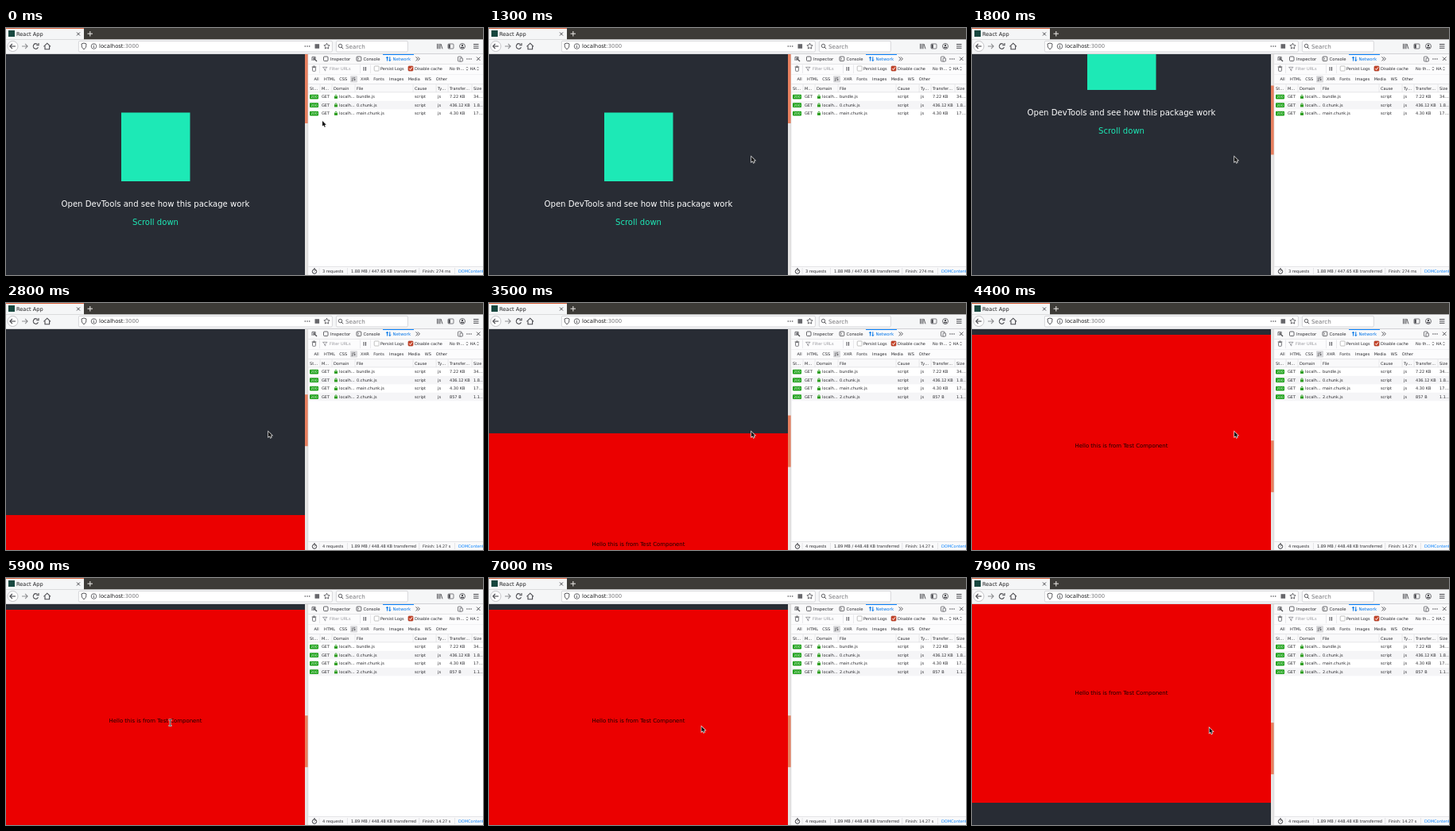
An HTML page with a canvas that plays this animation: 600x311 px, repeating every 8000 ms.

```html
<!DOCTYPE html>
<html lang="en">
<head>
<meta charset="utf-8">
<title>Lazy loading demo</title>
<style>
html, body { margin: 0; width: 600px; height: 311px; overflow: hidden; }
canvas { display: block; width: 600px; height: 311px; }
</style>
</head>
<body>
<canvas id="stage"></canvas>
<script>
const W = 600, H = 311, LOOP = 8000, STEP = 100;
const TOP = 33, VIEW = 278, PAGE_W = 376;
const LOAD_AT = 2500;
const FONT = '"DejaVu Sans", sans-serif';
const DARK = '#282c34', MINT = '#1de9b6', INK = '#2a2a2e', ICON = '#4a4a4f', BLUE = '#0074e8';

// [time, scroll]
const SCROLL = [[1400, 0], [1800, 115], [2800, 322], [3800, 469], [4400, 549], [7300, 549], [7900, 584]];
// [time, x, y]
const POINTER = [[0, 398, 117], [1000, 330, 162], [4500, 330, 162], [5100, 302, 173], [5300, 302, 173],
  [5900, 206, 182], [6200, 205, 184], [6400, 205, 184], [7300, 298.5, 188.5]];

const canvas = document.getElementById('stage');
const c = canvas.getContext('2d');
const ratio = window.devicePixelRatio || 1;
canvas.width = W * ratio;
canvas.height = H * ratio;

function track(keys, t, i) {
  if (t <= keys[0][0]) return keys[0][i];
  for (let k = 1; k < keys.length; k++) {
    const a = keys[k - 1], b = keys[k];
    if (t <= b[0]) return a[i] + (b[i] - a[i]) * (t - a[0]) / (b[0] - a[0]);
  }
  return keys[keys.length - 1][i];
}

function box(x, y, w, h, color) {
  c.fillStyle = color;
  c.fillRect(x, y, w, h);
}

function round(x, y, w, h, r, fill, stroke) {
  c.beginPath();
  c.roundRect(x, y, w, h, r);
  if (fill) { c.fillStyle = fill; c.fill(); }
  if (stroke) { c.strokeStyle = stroke; c.lineWidth = 0.7; c.stroke(); }
}

function disc(x, y, r, fill, stroke, width = 0.9) {
  c.beginPath();
  c.arc(x, y, r, 0, Math.PI * 2);
  if (fill) { c.fillStyle = fill; c.fill(); }
  if (stroke) { c.strokeStyle = stroke; c.lineWidth = width; c.stroke(); }
}

function line(points, color = ICON, width = 1) {
  c.beginPath();
  points.forEach(([x, y], i) => i ? c.lineTo(x, y) : c.moveTo(x, y));
  c.strokeStyle = color;
  c.lineWidth = width;
  c.stroke();
}

// y is the middle of the capitals
function text(s, x, y, size = 5, color = INK, align = 'left') {
  c.font = `${size}px ${FONT}`;
  c.textAlign = align;
  c.fillStyle = color;
  c.fillText(s, x, y + size * 0.365);
}

function dots(x, y, gap, r) {
  for (let i = -1; i <= 1; i++) disc(x + i * gap, y, r, ICON);
}

function magnifier(x, y) {
  disc(x - 0.5, y - 0.5, 2.2, null, ICON);
  line([[x + 1.2, y + 1.2], [x + 3.2, y + 3.2]]);
}

function star(x, y, r) {
  const points = [];
  for (let i = 0; i <= 10; i++) {
    const a = i * Math.PI / 5 - Math.PI / 2, d = i % 2 ? r * 0.48 : r;
    points.push([x + d * Math.cos(a), y + d * Math.sin(a)]);
  }
  line(points, ICON, 0.8);
}

function arrow(x, y, dir) {
  line([[x - 3.5 * dir, y], [x + 3.5 * dir, y]], ICON, 1.1);
  line([[x + 0.6 * dir, y - 3], [x + 3.6 * dir, y], [x + 0.6 * dir, y + 3]], ICON, 1.1);
}

function chrome() {
  box(0, 0, W, 14.5, '#3d3b37');
  box(0, 0, 98, 14.5, '#f5f6f7');
  box(0, 0, 98, 1, '#d9603b');
  box(3, 3, 8, 8, '#17473f');
  text('React App', 13, 7.5, 6.6, '#1c1c1e');
  line([[89, 5.5], [93, 9.5]]);
  line([[93, 5.5], [89, 9.5]]);
  line([[102.5, 7.2], [109, 7.2]], '#deddda', 1.1);
  line([[105.8, 4], [105.8, 10.5]], '#deddda', 1.1);

  box(0, 14.5, W, 18.5, '#f5f6f7');
  box(0, 32.2, W, 0.8, '#c9c9cc');
  disc(8.5, 23, 6.5, '#fff', '#b8b8bc', 0.8);
  arrow(8.5, 23, -1);
  c.globalAlpha = 0.55;
  arrow(23.5, 23, 1);
  c.globalAlpha = 1;
  c.beginPath();
  c.arc(37.5, 23, 3.2, 0.4, 5.4);
  c.strokeStyle = ICON;
  c.lineWidth = 1.1;
  c.stroke();
  line([[41, 19], [41, 21.8], [38.2, 21.8]], ICON, 1.1);
  line([[47.5, 23.3], [51.8, 19.2], [56, 23.3]], ICON, 1.1);
  line([[49, 22.8], [49, 26.8], [54.6, 26.8], [54.6, 22.8]], ICON, 1.1);

  round(91.4, 16.4, 319, 13.6, 1.5, '#fff', '#c8c8cc');
  line([[98, 19], [101, 20], [100.6, 24], [98, 27], [95.4, 24], [95, 20], [98, 19]], ICON, 0.9);
  disc(110.5, 23, 3.3, null, ICON, 0.8);
  line([[110.5, 22.4], [110.5, 25]], ICON, 0.9);
  line([[110.5, 20.7], [110.5, 21.5]], ICON, 0.9);
  text('localhost', 117, 23, 6.8, '#1c1c1e');
  const hostWidth = c.measureText('localhost').width;
  text(':3000', 117 + hostWidth, 23, 6.8, '#77777a');
  dots(379, 23, 2.7, 0.8);
  box(388.5, 20.2, 5.6, 5.6, '#67676b');
  star(403.5, 23, 3.8);

  round(415.4, 16.4, 90, 13.6, 1.5, '#fff', '#c8c8cc');
  magnifier(421, 23);
  text('Search', 427, 23, 7.2, '#747478');

  for (let x = 542.5; x < 547; x += 1.8) line([[x, 19.8], [x, 26.3]], ICON, 0.9);
  line([[547, 20], [549, 26.3]], ICON, 0.9);
  round(556, 20, 7, 6, 1, null, ICON);
  box(556.5, 20.5, 2.3, 5, ICON);
  disc(574, 23, 3.5, null, ICON, 0.8);
  disc(574, 21.9, 1.2, ICON);
  box(572, 23.8, 4, 1.5, ICON);
  for (let y = 20.5; y < 26; y += 2.4) line([[588, y], [594.5, y]]);
}

function page(t, scroll) {
  const loaded = t >= LOAD_AT;
  c.save();
  c.beginPath();
  c.rect(0, TOP, PAGE_W, VIEW);
  c.clip();
  box(0, TOP, PAGE_W, VIEW, DARK);
  c.translate(0, TOP - scroll);
  box(145, 73.5, 86.5, 86.5, MINT);
  text('Open DevTools and see how this package work', 188, 188.7, 10.08, '#fff', 'center');
  text('Scroll down', 188, 210.9, 10.08, MINT, 'center');
  if (loaded) {
    box(0, 2 * VIEW, PAGE_W, VIEW, '#eb0000');
    text('Hello this is from Test Component', 188, 2 * VIEW + 139, 6.95, '#180000', 'center');
  }
  c.restore();

  const thumb = loaded ? 65 : 87, range = VIEW * (loaded ? 3 : 2);
  box(PAGE_W, TOP, 4, VIEW, '#e6e5e4');
  box(PAGE_W, TOP + scroll / range * (VIEW - thumb), 4, thumb, '#e8805f');
  box(379.6, TOP, 0.8, VIEW, '#d0d0d3');
}

function tabs() {
  box(380.4, 33, 220, 12.5, '#f9f9fa');
  line([[385, 41], [385, 36.5], [389.5, 36.5]], ICON, 0.8);
  line([[387, 38], [391, 42]], ICON, 1.2);
  line([[387, 41], [387, 38], [390, 38]], ICON, 1);
  round(399.5, 36, 5.5, 5.5, 1, null, INK);
  text('Inspector', 408, 38.8, 5.4);
  round(441, 36, 5.8, 5.5, 1, null, INK);
  line([[442.2, 37.5], [443.6, 38.8], [442.2, 40]], INK, 0.7);
  text('Console', 449.5, 38.8, 5.3);
  box(474, 33, 39, 1, '#0a84ff');
  line([[479.5, 41.5], [479.5, 36.3]], BLUE, 1);
  line([[478, 38], [479.5, 36.2], [481, 38]], BLUE, 0.8);
  line([[482.8, 36.3], [482.8, 41.5]], BLUE, 1);
  line([[481.3, 39.8], [482.8, 41.6], [484.3, 39.8]], BLUE, 0.8);
  text('Network', 486.5, 38.8, 5.4, BLUE);
  for (const x of [515.5, 518]) line([[x, 36.4], [x + 2.4, 38.9], [x, 41.4]], ICON, 0.9);
  round(568.5, 36, 4.5, 6, 0.8, null, ICON);
  round(571, 38, 3.5, 4, 0.6, '#f9f9fa', ICON);
  dots(582.5, 39, 2.5, 0.75);
  line([[592, 36.5], [596.5, 41]], ICON, 0.9);
  line([[596.5, 36.5], [592, 41]], ICON, 0.9);
}

function spinner(x, y) {
  line([[x, y - 0.8], [x + 1, y - 2], [x + 2, y - 0.8]], INK, 0.6);
  line([[x, y + 0.8], [x + 1, y + 2], [x + 2, y + 0.8]], INK, 0.6);
}

function filters() {
  box(380.4, 45.5, 220, 12.8, '#fcfcfd');
  box(380.4, 45.2, 220, 0.6, '#d7d7db');
  box(380.4, 58, 220, 0.6, '#e0e0e2');
  line([[384.7, 49], [390.3, 49]], ICON, 0.9);
  line([[386.5, 48], [388.5, 48]], ICON, 0.8);
  round(385.5, 49.5, 4, 4.8, 0.7, null, ICON);
  box(394, 46.5, 0.5, 10.5, '#d7d7db');
  line([[398.5, 49.3], [404, 49.3], [401.8, 51.6], [401.8, 54], [400.6, 53], [400.6, 51.6], [398.5, 49.3]], '#8a8a90', 0.8);
  text('Filter URLs', 407, 51.5, 5, '#98989d');
  box(445.2, 46.5, 0.5, 10.5, '#d7d7db');
  box(449.6, 49, 1, 4.8, ICON);
  box(452, 49, 1, 4.8, ICON);
  box(458.2, 46.5, 0.5, 10.5, '#d7d7db');
  round(463.2, 48, 6, 6, 1, '#fff', '#aaa9a6');
  text('Persist Logs', 471, 51.2);
  round(506, 48, 6, 6, 1, '#c8462c', '#a63a25');
  line([[507.3, 51], [508.6, 52.6], [511, 49.3]], '#fff', 1);
  text('Disable cache', 514, 51.2);
  text('No th…', 558, 51.2);
  spinner(579, 51.2);
  text('HA', 583.5, 51.2);
  spinner(592.5, 51.2);

  box(380.4, 58.6, 220, 12, '#fcfcfd');
  round(433, 60.2, 9, 8.2, 1, '#d9d9dc');
  [['All', 387.5], ['HTML', 400], ['CSS', 419.3], ['JS', 435], ['XHR', 446], ['Fonts', 462.3],
    ['Images', 482], ['Media', 505.8], ['WS', 526.8], ['Other', 540.8]]
    .forEach(([s, x]) => text(s, x, 64.3));
}

const COLS = [382, 397, 412, 441, 514, 543, 558, 588];

function lock(x, y) {
  box(x - 2, y - 0.6, 4, 3, '#2a9c1c');
  c.beginPath();
  c.arc(x, y - 0.8, 1.3, Math.PI, 0);
  c.strokeStyle = '#2a9c1c';
  c.lineWidth = 0.8;
  c.stroke();
}

function request(i, file, transfer, size) {
  const y = 86.5 + i * 10.5;
  if (i % 2) box(380.4, y - 5.2, 220, 10.5, '#f5f5f7');
  round(382, y - 2.8, 11, 5.8, 1, '#1c9f18');
  text('200', 387.5, y + 0.1, 4.4, '#eaffea', 'center');
  lock(415, y);
  ['GET', '', 'script', 'js', transfer, size].forEach((s, k) => {
    const col = [1, 2, 4, 5, 6, 7][k];
    text(s, COLS[col], y);
  });
  text('localh…', 419, y);
  text(file, COLS[3], y);
}

function network(t) {
  const loaded = t >= LOAD_AT;
  box(380.4, 33, 220, VIEW, '#fff');
  tabs();
  filters();
  box(380.4, 70.6, 220, 10.4, '#f9f9fa');
  box(380.4, 70.4, 220, 0.6, '#d7d7db');
  box(380.4, 80.6, 220, 0.6, '#d7d7db');
  ['St…', 'M…', 'Domain', 'File', 'Cause', 'Ty…', 'Transfer…', 'Size']
    .forEach((s, i) => {
      text(s, COLS[i], 75.7);
      if (i) box(COLS[i] - 2.2, 71, 0.5, 10, '#d7d7db');
    });
  request(0, 'bundle.js', '7.22 KB', '34.…');
  request(1, '0.chunk.js', '436.12 KB', '1.8…');
  request(2, 'main.chunk.js', '4.30 KB', '17.…');
  if (loaded) request(3, '2.chunk.js', '857 B', '1.1…');

  box(380.4, 300, 220, 11, '#f9f9fa');
  box(380.4, 300, 220, 0.6, '#d7d7db');
  disc(388, 306.6, 2.7, null, INK, 0.9);
  line([[388, 306.6], [389.4, 305.2]], INK, 0.8);
  line([[387, 303], [389, 303]], INK, 0.9);
  for (const x of [393.8, 429, 519.6, 564]) box(x, 302, 0.5, 8, '#d0d0d4');
  text(loaded ? '4 requests' : '3 requests', 398, 306.2);
  text(loaded ? '1.89 MB / 448.48 KB transferred' : '1.88 MB / 447.65 KB transferred', 434, 306.2, 5.1);
  text(loaded ? 'Finish: 14.27 s' : 'Finish: 274 ms', 524, 306.2, 4.9);
  text('DOMContent', 569, 306.2, 5, '#0a84ff');
}

function pointer(t, scroll) {
  const x = track(POINTER, t, 1), y = track(POINTER, t, 2);
  const textY = TOP + 2 * VIEW + 139 - scroll;
  if (t >= LOAD_AT && x > 129 && x < 247 && Math.abs(y - textY) < 6) {
    for (const [color, w] of [['#fff', 1.8], ['#333', 0.8]]) {
      line([[x + 0.5, y - 3.5], [x + 0.5, y + 4]], color, w);
      line([[x - 1.5, y - 3.5], [x + 2.5, y - 3.5]], color, w);
      line([[x - 1.5, y + 4], [x + 2.5, y + 4]], color, w);
    }
    return;
  }
  c.beginPath();
  [[0, 0], [0, 6.6], [1.6, 5.3], [2.7, 7.8], [3.8, 7.3], [2.7, 4.9], [4.7, 4.7]]
    .forEach(([dx, dy]) => c.lineTo(x + dx, y + dy));
  c.closePath();
  c.strokeStyle = '#f4f4f4';
  c.lineWidth = 1.3;
  c.stroke();
  c.fillStyle = '#111';
  c.fill();
}

function draw(now) {
  const t = Math.floor((now % LOOP) / STEP) * STEP;
  const scroll = track(SCROLL, t, 1);
  c.setTransform(ratio, 0, 0, ratio, 0, 0);
  chrome();
  page(t, scroll);
  network(t);
  pointer(t, scroll);
}

const start = performance.now();
function frame() {
  draw(performance.now() - start);
  requestAnimationFrame(frame);
}
frame();
</script>
</body>
</html>
```
